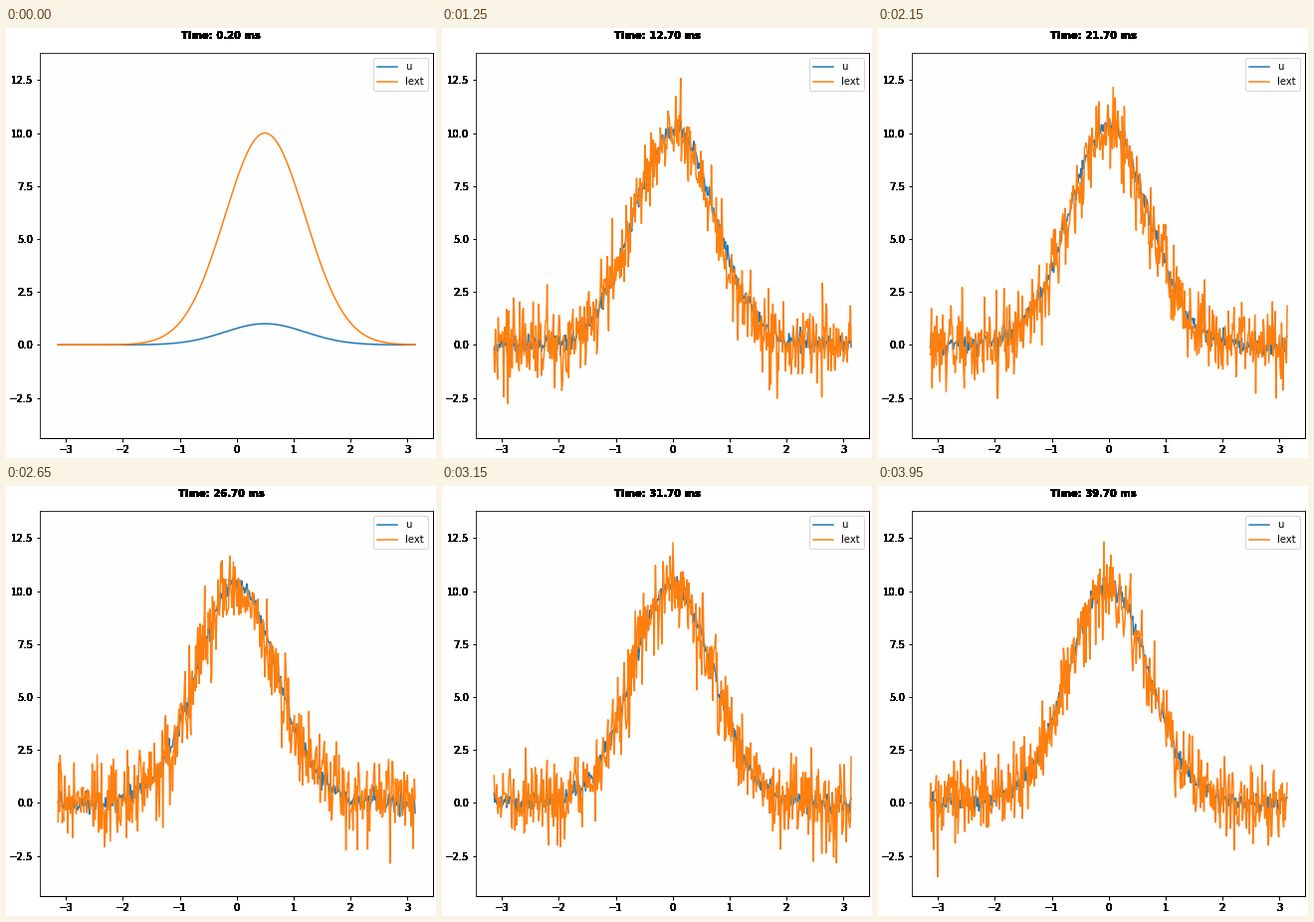
A matplotlib script for the animation above (4000 ms loop, 432 px wide and 432 px high).

```python
import numpy as np
import matplotlib.pyplot as plt
from matplotlib.animation import FuncAnimation

# Continuous attractor network on a ring, driven by an external bump
NUM, DT, TAU = 512, 0.1, 1.0
K, A_WIDTH, AMP, J0 = 8.1, 0.5, 10.0, 4.0
STEPS, SWITCH, STRIDE = 400, 100, 5
INTERVAL = 50

SIZE, DPI = 432, 72
LEFT, RIGHT, TOP, BOTTOM = 34.3, 429.0, 25.3, 412.2
HEAVY = 18  # repeated draws harden the glyph edges

x = np.linspace(-np.pi, np.pi, NUM)


def ring_dist(d):
    return (d + np.pi) % (2 * np.pi) - np.pi


def stimulus(pos):
    return AMP * np.exp(-0.25 * (ring_dist(x - pos) / A_WIDTH) ** 2)


def simulate():
    rng = np.random.default_rng(7)
    d = ring_dist(x[:, None] - x)
    conn = J0 * np.exp(-0.5 * (d / A_WIDTH) ** 2) / (np.sqrt(2 * np.pi) * A_WIDTH)

    inputs = np.empty((STEPS, NUM))
    inputs[:SWITCH] = stimulus(0.5)
    noise = 0.1 * AMP * rng.standard_normal((STEPS - SWITCH, NUM))
    inputs[SWITCH:] = stimulus(0.0) + noise

    states = np.empty_like(inputs)
    u = np.zeros(NUM)
    for i, ext in enumerate(inputs):
        rate = u ** 2 / (1 + K * np.sum(u ** 2))
        u = u + DT / TAU * (-u + conn @ rate + ext)
        states[i] = u
    return states, inputs


states, inputs = simulate()

plt.rcParams["font.family"] = "DejaVu Sans"
fig = plt.figure(figsize=(SIZE / DPI, SIZE / DPI), dpi=DPI)
ax = fig.add_axes([LEFT / SIZE, 1 - BOTTOM / SIZE,
                   (RIGHT - LEFT) / SIZE, (BOTTOM - TOP) / SIZE],
                  facecolor="#fefefe")
ax.spines[["right", "bottom"]].set_linewidth(1)

line_u, = ax.plot(x, states[0], label="u")
line_ext, = ax.plot(x, inputs[0], label="Iext")
ax.set_xlim(-1.1 * np.pi, 1.1 * np.pi)
ax.set_ylim(-4.41, 13.77)

xticks = np.arange(-3, 4)
yticks = np.arange(-2.5, 13, 2.5)
ax.set_xticks(xticks)
ax.set_yticks(yticks)
ax.tick_params(width=1, labelbottom=False, labelleft=False)
ax.legend(loc="upper right")


def heavy_text(px, py, s, **kw):
    return [fig.text(px, py, s, fontsize=10, **kw) for _ in range(HEAVY)]


def minus(s):
    return s.replace("-", "\u2212")


trans, va, ha = ax.get_xaxis_text1_transform(7)
for t in xticks:
    heavy_text(t, 0, minus(f"{t}"), transform=trans, va=va, ha=ha)
trans, va, ha = ax.get_yaxis_text1_transform(7)
for t in yticks:
    heavy_text(0, t, minus(f"{t:.1f}"), transform=trans, va=va, ha=ha)

titles = heavy_text(0.5, 1 - 3 / SIZE, "", fontweight="bold",
                    va="top", ha="center")


def update(frame):
    step = frame * STRIDE
    line_u.set_ydata(states[step])
    line_ext.set_ydata(inputs[step])
    for title in titles:
        title.set_text(f"Time: {(step + 2) * DT:.2f} ms")
    return [line_u, line_ext, *titles]


anim = FuncAnimation(fig, update, frames=STEPS // STRIDE, interval=INTERVAL,
                     repeat=True, repeat_delay=0, blit=False)
plt.show()
```
